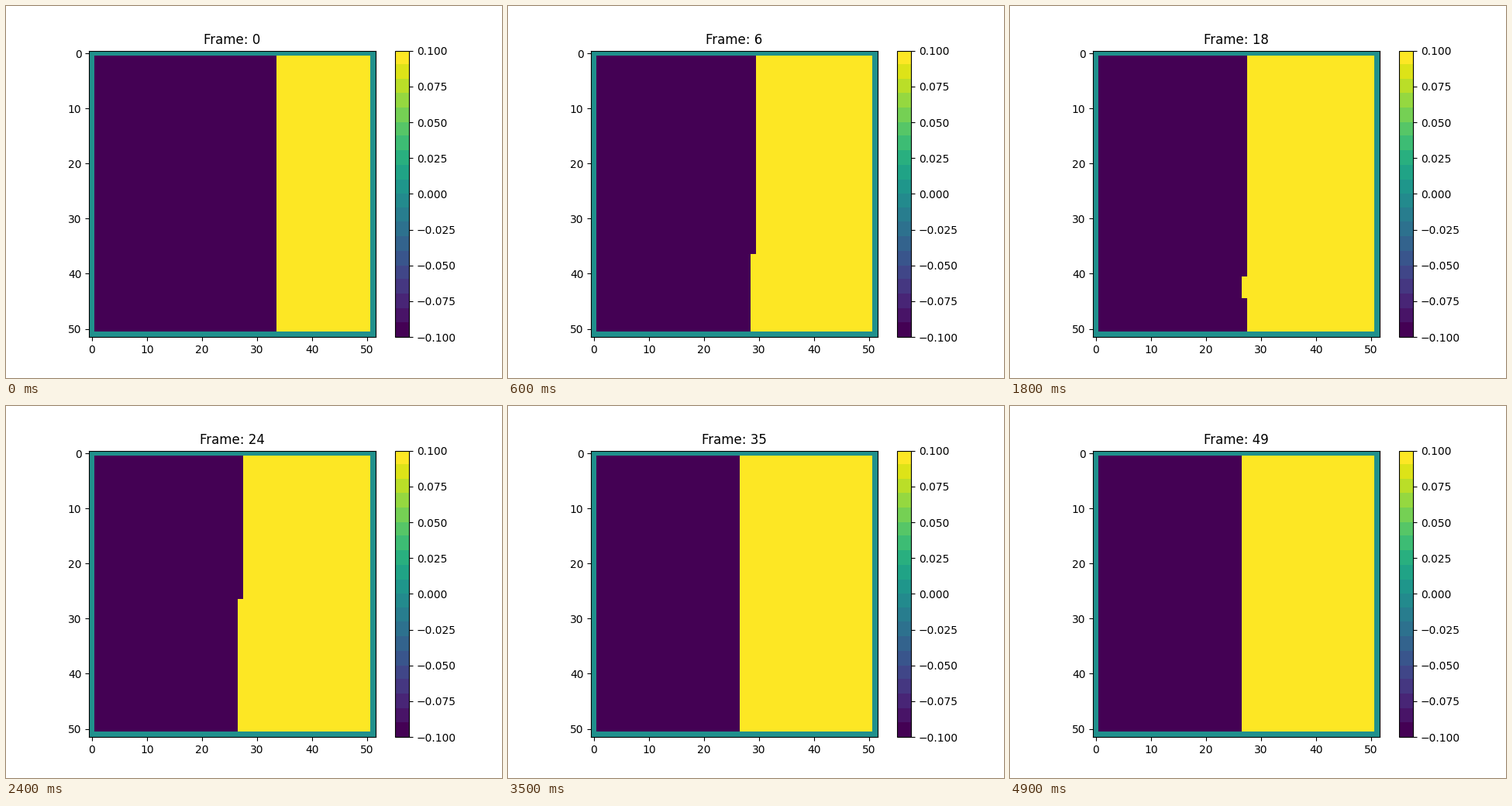
Animation of 640 by 480 pixels, one loop 5000 ms. Source, as a matplotlib script:

```python
import numpy as np
import matplotlib.pyplot as plt
from matplotlib.animation import FuncAnimation

SIZE = 52
FRAMES = 50
LEVEL = 0.1
START_COLUMN = 34
EARLY_LAYERS = 5
LAST_LAYER = 6
SLOWEST = 2.4   # rows per frame in the last layer
SLOWDOWN = 0.45  # speed ratio from one layer to the next
BANDS = 20

plt.rcParams.update({"text.hinting": "force_autohint",
                     "text.hinting_factor": 8})

ROWS = np.arange(1, SIZE - 1)

# Seeds (row, start frame) of each one-column layer, from right to left.
SEEDS = [[(SIZE - 2, 0.45 + 1.1 * layer)] for layer in range(EARLY_LAYERS)]
SEEDS += [[(SIZE - 2, 8.3), (1, 10.3)],
          [(42.5, 17.3), (1, 26.4)]]


def flip_times(layer):
    """Frame at which each row flips as the layer grows from its seeds."""
    speed = SLOWEST / SLOWDOWN ** (LAST_LAYER - layer)
    return np.min([start + abs(ROWS - row) / speed
                   for row, start in SEEDS[layer]], axis=0)


FLIPS = [flip_times(layer) for layer in range(len(SEEDS))]


def field(frame):
    grid = np.zeros((SIZE, SIZE))
    grid[1:-1, 1:-1] = -LEVEL
    grid[1:-1, START_COLUMN:-1] = LEVEL
    for layer, times in enumerate(FLIPS):
        grid[1:-1, START_COLUMN - 1 - layer] = np.where(
            times <= frame, LEVEL, -LEVEL)
    return grid


def band_values(count):
    """Step the colour scale into equal flat bands."""
    return np.linspace(-LEVEL, LEVEL, BANDS)[np.arange(count) * BANDS // count]


fig, ax = plt.subplots(figsize=(6.4, 4.8), dpi=100)
image = ax.imshow(field(0), cmap="viridis", vmin=-LEVEL, vmax=LEVEL)
title = ax.set_title("Frame: 0")
bar = fig.colorbar(image, ax=ax)
cells = bar.solids.get_array()
bar.solids.set_array(band_values(cells.size).reshape(cells.shape))


def update(frame):
    image.set_data(field(frame))
    title.set_text(f"Frame: {frame}")
    return image, title


animation = FuncAnimation(fig, update, frames=FRAMES, interval=100,
                          repeat=True, repeat_delay=0)
plt.show()
```
